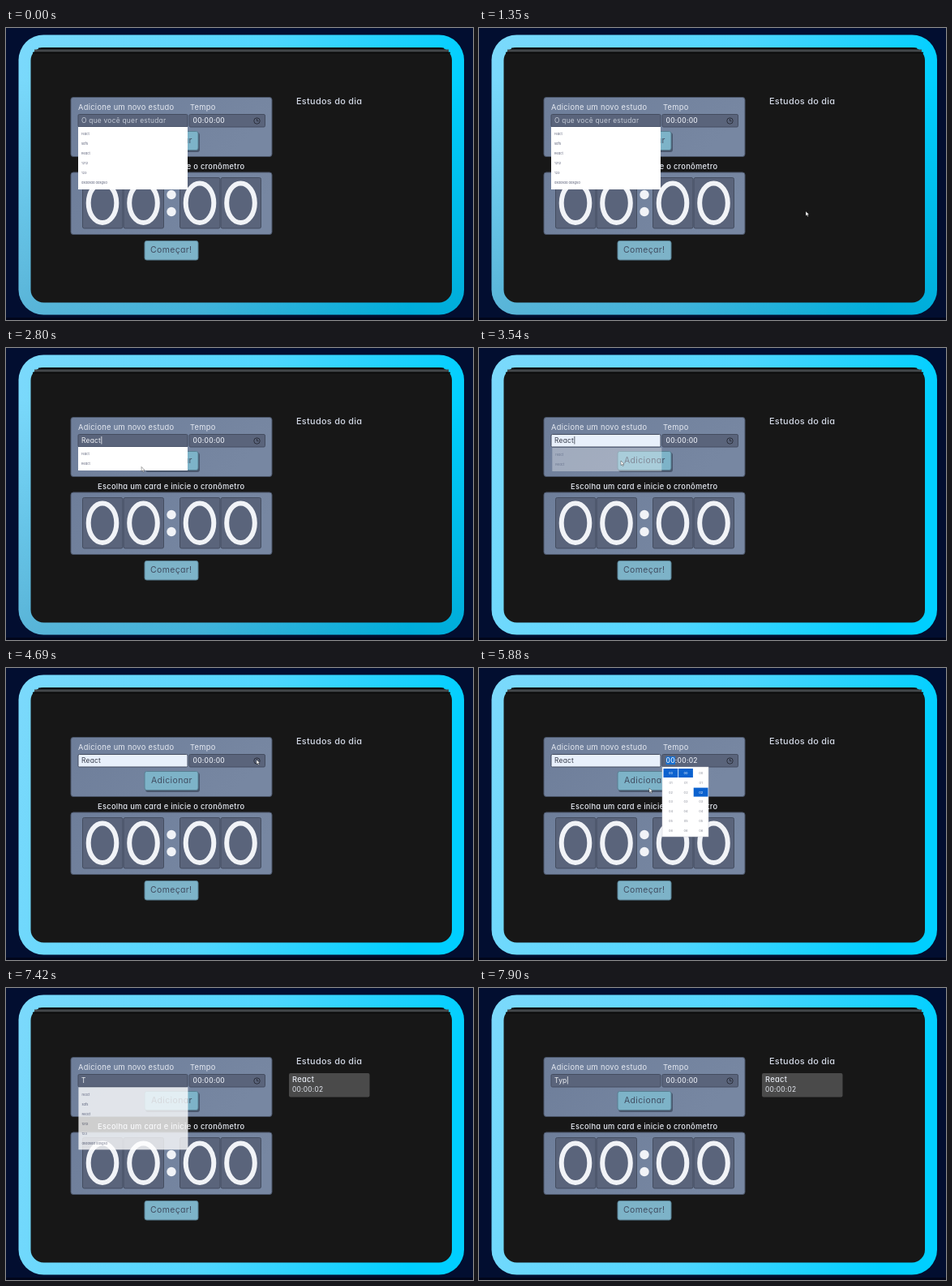
Recreate the animation shown at these times as an HTML page. Size 576 by 360 pixels, loop 7.99 s.

```html
<!DOCTYPE html>
<html lang="pt">
<head>
<meta charset="utf-8">
<title>Cronômetro de estudos</title>
<style>
html, body { margin: 0; width: 100%; height: 100%; overflow: hidden; background: #020e30; }
svg { display: block; width: 100vw; height: 100vh; }
text { font-family: Inter, "Open Sans", sans-serif; font-feature-settings: "cv11"; fill: #e6eaf2; white-space: pre; }
.label { font-size: 9.3px; letter-spacing: .3px; }
.value { font-size: 8.4px; letter-spacing: .25px; }
.title { font-size: 10.9px; letter-spacing: .3px; fill: #d3d9e6; }
.button { font-size: 10.5px; letter-spacing: .35px; fill: #414d61; }
.tiny { font-size: 4px; fill: #5b6078; }
.cell { font-size: 4px; fill: #8a8d99; text-anchor: middle; }
.panel { fill: url(#slate); stroke: #4a5569; }
.field { fill: #5a647b; stroke: #444d60; }
.push { fill: #7db3c8; stroke: #587f92; }
</style>
</head>
<body>
<svg viewBox="0 0 576 360">
  <defs>
    <linearGradient id="ring" x2="1" y2=".15">
      <stop stop-color="#7cd9fb"/><stop offset=".55" stop-color="#4fd6ff"/><stop offset="1" stop-color="#00cfff"/>
    </linearGradient>
    <linearGradient id="dusk" x2="0" y2="1">
      <stop offset=".15" stop-color="#024" stop-opacity="0"/><stop offset="1" stop-color="#024" stop-opacity=".2"/>
    </linearGradient>
    <linearGradient id="slate" x2="1" y2=".3">
      <stop stop-color="#6e7e9a"/><stop offset="1" stop-color="#7787a2"/>
    </linearGradient>
  </defs>
  <rect width="576" height="360" fill="#020e30"/>
  <rect y="357" width="576" height="3" fill="#01061a"/>
  <rect x="15.5" y="8.5" width="549.5" height="345" rx="31" fill="url(#ring)"/>
  <rect id="shade" x="15.5" y="8.5" width="549.5" height="345" rx="31" fill="url(#dusk)"/>
  <rect x="30.5" y="24" width="519.5" height="314.5" rx="16" fill="#171717"/>
  <path d="M40 25.2H540" stroke="#0a0c0e" stroke-width="1.6"/>
  <path d="M35 28H546" stroke="#43474a" stroke-width="3"/>
  <path d="M33 30.5H548" stroke="#0a0a0a" stroke-width="1.5"/>

  <rect class="panel" x="80" y="85.5" width="248" height="73" rx="3"/>
  <text class="label" x="89" y="100.5">Adicione um novo estudo</text>
  <text class="label" x="227" y="100.5">Tempo</text>
  <rect id="input" class="field" x="89" y="106.5" width="135" height="15.5" rx="1.5"/>
  <text id="typed" class="value" x="93" y="117"></text>
  <rect id="caret" y="109" width=".8" height="9.5"/>
  <rect class="field" x="226" y="106.5" width="93.5" height="15.5" rx="1.5"/>
  <rect id="hourMark" x="230.5" y="109" width="11.5" height="10" fill="#176fd0"/>
  <text id="time" class="value" x="230.5" y="117" font-weight="500"></text>
  <g fill="none" stroke="#272b36" stroke-width=".9">
    <circle cx="309.5" cy="114.5" r="3.7"/><path d="M309.5 112v2.7h2"/>
  </g>
  <rect x="172" y="129" width="67" height="24" rx="3" fill="#2d3a4b" opacity=".6"/>
  <rect class="push" x="171" y="127.5" width="66" height="23" rx="2.5"/>
  <text class="button" x="179" y="142">Adicionar</text>

  <text class="label" x="113" y="174" font-weight="500">Escolha um card e inicie o cronômetro</text>
  <rect class="panel" x="80" y="178" width="248" height="76.5" rx="3"/>
  <g id="digits"></g>
  <g fill="#f1f3f7"><circle cx="204" cy="205.5" r="5.7"/><circle cx="204" cy="226.5" r="5.7"/></g>
  <rect class="push" x="171" y="262.5" width="66" height="23.5" rx="2.5"/>
  <text class="button" x="178" y="277">Começar!</text>

  <text class="title" x="358" y="93.5" font-weight="500">Estudos do dia</text>
  <g id="card">
    <rect x="349" y="105" width="99.5" height="29.5" rx="2" fill="#4a4a4a"/>
    <text class="label" x="353" y="116" font-weight="500">React</text>
    <text class="value" x="353" y="128">00:00:02</text>
  </g>

  <g id="list">
    <rect id="sheet" x="89" y="122" width="135" fill="#fff"/>
    <g id="items"></g>
  </g>
  <g id="picker">
    <rect x="226" y="122" width="57" height="86" fill="#fff" stroke="#c9ccd4" stroke-width=".5"/>
    <g id="cells"></g>
  </g>
  <path id="cursor" d="M0 0V5.6L1.4 4.5 2.3 6.5 3.3 6 2.4 4.1H4.1Z" fill="#fff" stroke="#222" stroke-width=".4"/>
</svg>
<script>
const LOOP = 7990, ADDED = 6030;
const $ = id => document.getElementById(id);
const show = (id, on) => $(id).style.opacity = +on;
const clamp = v => Math.max(0, Math.min(1, v));
const within = (t, a, b) => t >= a && t < b;

const words = ["react", "sdfs", "React", "1212", "123", "asdasda dasgsd"];
const typing = [[1980, "R"], [2110, "Re"], [2240, "Rea"], [2370, "Reac"], [2520, "React"],
  [ADDED, ""], [7410, "T"], [7600, "Ty"], [7800, "Typ"]];
// Cursor stops: time, x, y
const path = [[510, 214, 128], [1280, 403, 226], [1350, 403, 226], [2110, 221, 159], [2480, 221, 159],
  [2940, 152, 143], [3200, 151, 142], [3480, 160, 141], [3540, 175, 139], [3800, 260, 146],
  [3940, 260, 146], [4690, 309, 113], [4760, 309, 113], [5350, 273, 152], [5520, 273, 152],
  [5660, 222, 152], [5880, 210, 148], [5960, 206, 140], [6080, 206, 140], [6370, 152, 113]];

// The big zeros are plain ovals
$("digits").innerHTML = [94.5, 145, 214.5, 265].map(x =>
  `<rect class="field" x="${x}" y="184.5" width="49.5" height="62.5" rx="2"/>
   <ellipse cx="${x + 24.5}" cy="215.7" rx="17.3" ry="24.3" fill="none" stroke="#f1f3f7" stroke-width="6"/>`).join("");

function drawList(t, text) {
  const found = words.filter(w => w.toLowerCase().startsWith(text.toLowerCase()));
  const rows = found.length ? found : words;
  $("sheet").setAttribute("height", 5 + 12 * rows.length);
  $("items").innerHTML = rows.map((w, i) => `<text class="tiny" x="93" y="${132.3 + 12 * i}">${w}</text>`).join("");
  const end = t < 5000 ? 3475 : 7400;
  const fade = clamp((t - end) / 100);
  show("list", within(t, 3600, 6510) ? 0 : 1 - fade);
  $("list").setAttribute("transform", `translate(${fade * 2} ${fade * 1.5})`);
}

function drawPicker(t, picked) {
  show("picker", t < 4760 ? 0 : 1 - clamp((t - 5960) / 100));
  let out = "";
  for (let c = 0; c < 3; c++) for (let r = 0; r < 7; r++) {
    const x = 236.5 + 18.6 * c, y = 129.5 + 11.8 * r;
    const on = r === (c === 2 && picked ? 2 : 0);
    if (on) out += `<rect x="${x - 9}" y="${y - 5.5}" width="17.8" height="11" fill="#0b62cf"/>`;
    out += `<text class="cell" x="${x}" y="${y + 1.5}"${on ? ' style="fill:#fff"' : ""}>0${r}</text>`;
  }
  $("cells").innerHTML = out;
}

function drawCursor(t) {
  const i = path.findIndex(p => p[0] > t);
  const b = path[i < 0 ? path.length - 1 : i], a = i > 0 ? path[i - 1] : b;
  const k = a === b ? 0 : (t - a[0]) / (b[0] - a[0]);
  const e = k * k * (3 - 2 * k);
  $("cursor").setAttribute("transform", `translate(${a[1] + (b[1] - a[1]) * e} ${a[2] + (b[2] - a[2]) * e})`);
  show("cursor", within(t, 510, 6830));
}

function draw(t) {
  const text = typing.reduce((s, [at, w]) => t >= at ? w : s, "");
  const filled = within(t, 3480, ADDED), picked = within(t, 5420, ADDED);
  const ink = filled ? "#353b4a" : text ? "#f1f3f7" : "#c3cad6";
  const typed = $("typed");
  typed.textContent = text || "O que você quer estudar";
  typed.style.fill = ink;
  $("input").style.fill = filled ? "#e8f0fb" : "";
  $("caret").setAttribute("x", 93.4 + typed.getComputedTextLength());
  $("caret").style.fill = ink;
  show("caret", text && (t < 3800 || t > 7500));
  $("time").textContent = picked ? "00:00:02" : "00:00:00";
  show("hourMark", within(t, 4760, ADDED));
  show("card", t >= ADDED);
  show("shade", t < 2940);
  drawList(t, text);
  drawPicker(t, picked);
  drawCursor(t);
}

const start = performance.now();
function tick(now) {
  draw(Math.max(0, now - start) % LOOP);
  requestAnimationFrame(tick);
}
draw(0);
requestAnimationFrame(tick);
</script>
</body>
</html>
```
